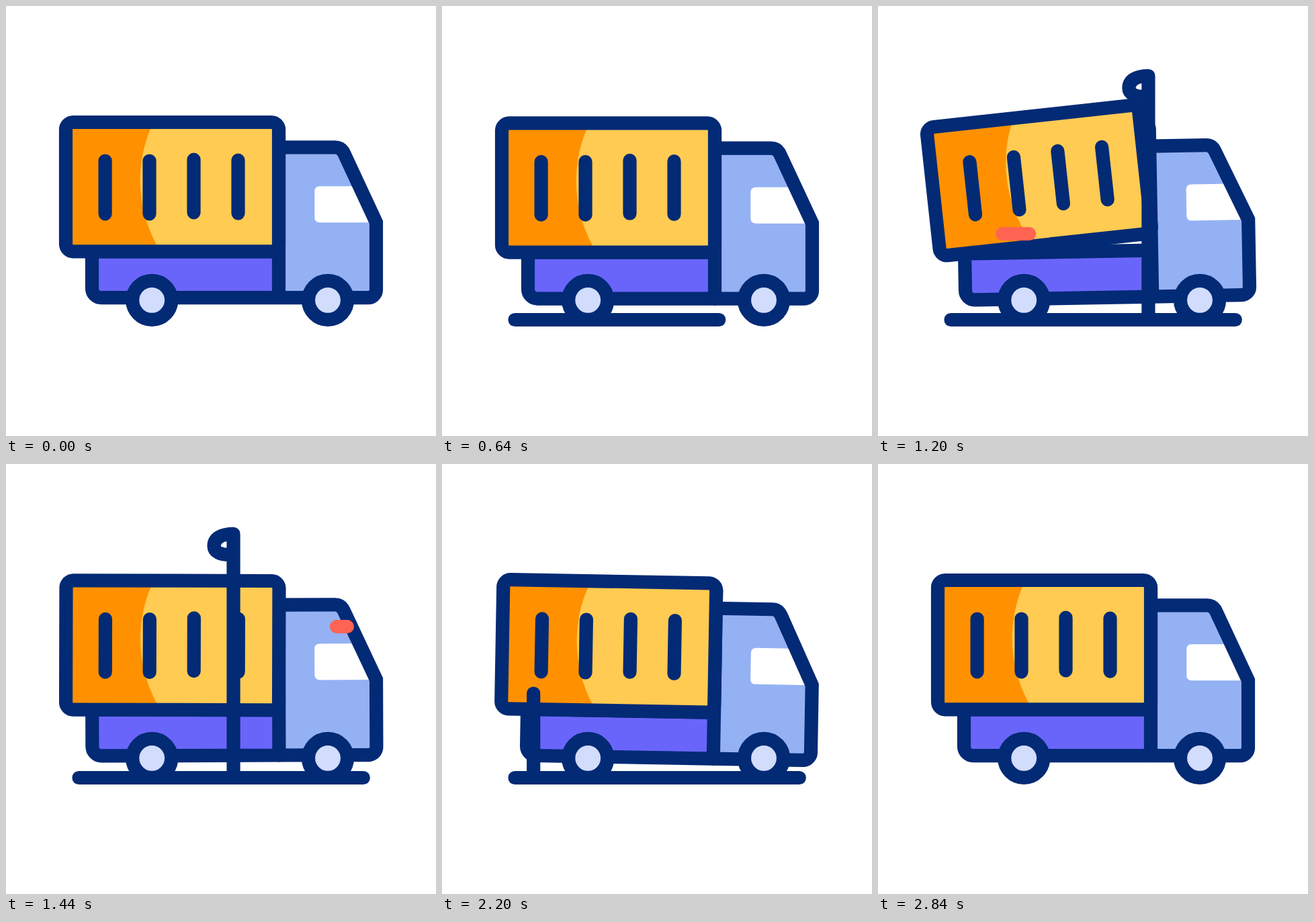
Write an HTML page that moves like this. It is 640 px wide and 640 px high and loops after 3000 ms.

```html
<!DOCTYPE html>
<html lang="en">
<head>
<meta charset="utf-8">
<title>Delivery truck</title>
<style>
html, body { margin: 0; width: 100%; height: 100%; overflow: hidden; background: #fff; }
svg { display: block; width: 100vw; height: 100vh; }
.line { fill: none; stroke: #032a75; stroke-width: 20.2; stroke-linecap: round; stroke-linejoin: round; }
.red { stroke: #ff6453; stroke-width: 20; }
</style>
</head>
<body>
<svg viewBox="0 0 640 640">
  <g id="truck">
    <path fill="#6a65fa" d="M128 365.3H406V434.2H142A14 14 0 0 1 128 420.2Z"/>
    <path fill="#94b1f3" d="M406 210.3H490Q499 210.3 503 219L551 322V422A12 12 0 0 1 539 434.2H406Z"/>
    <path fill="#fff" d="M467 268.3H520L546 322.3H467Q459.3 322.3 459.3 314.5V276Q459.3 268.3 467 268.3Z"/>
    <path class="line" d="M406 365.3H128V420.2A14 14 0 0 0 142 434.2H406V183"/>
    <path class="line" style="stroke-linejoin:miter" d="M406 210.3H490Q499 210.3 503 219L551 322V422A12 12 0 0 1 539 434.2H406"/>
    <g id="box">
      <rect x="89" y="173" width="317" height="192.3" rx="11" fill="#ffcb52"/>
      <path fill="#ff9100" d="M89 183V355Q89 365 99 365H230L224 355C194 300 193 235 215 183L219 173H99Q89 173 89 183Z"/>
      <rect class="line" x="89" y="173" width="317" height="192.3" rx="11"/>
      <path class="line" d="M147.6 230.5V309.3M213.5 230.5V309.3M279.5 228.6V307.4M345.5 229.7V308.6"/>
    </g>
  </g>
  <g class="line" style="fill:#d2dcfc">
    <circle cx="217.2" cy="437.8" r="29"/>
    <circle cx="479" cy="437.8" r="29"/>
  </g>
  <path id="road" class="line"/>
  <path id="low" class="line red"/>
  <path id="high" class="line red"/>
  <path id="mid" class="line red"/>
  <path id="pole" class="line" d="M0 467V104C-17 104-29 110-29 122C-29 131-19 135-7 135H0"/>
</svg>
<script>
const LOOP = 3000, STEP = 40;
const LEFT = 108.5, RIGHT = 531.8;
const el = id => document.getElementById(id);
const pole = el('pole'), poleLen = pole.getTotalLength();

const ramp = (t, from, span = 400) => Math.min(1, Math.max(0, (t - from) / span));
// smooth rise and fall between two times
const swing = (t, from, to) => Math.sin(Math.PI * ramp(t, from, to - from)) ** 2;

const bounce = t => 3.9 * (swing(t, 40, 440) + swing(t, 440, 1440))
  + 4.2 * swing(t, 1440, 2360) - 6.3 * swing(t, 2360, 2840);
const sway = t => 1.15 * swing(t, 1800, 2840) - 1.1 * swing(t, 960, 1520);
const tilt = t => .7 * swing(t, 1400, 1560) - 7.8 * swing(t, 740, 1400);

function segment(id, y, x0, x1) {
  const shown = Math.abs(x1 - x0) > .01;
  el(id).style.display = shown ? '' : 'none';
  if (shown) el(id).setAttribute('d', `M${x0} ${y}H${x1}`);
}

// a streak whose tail follows its head after a lag
function gust(t, id, y, from, to, start, lag = 200) {
  const at = s => from + (to - from) * ramp(t, s);
  segment(id, y, at(start + lag), at(start));
}

function draw(t) {
  el('truck').setAttribute('transform', `translate(0 ${bounce(t)}) rotate(${sway(t)} 217 310)`);
  el('box').setAttribute('transform', `rotate(${tilt(t)} 123 337)`);

  segment('road', 467, LEFT, LEFT + (RIGHT - LEFT) * (ramp(t, 353) - ramp(t, 2265)));
  gust(t, 'low', 339, 453, 185, 660);
  gust(t, 'high', 242, 508, 384, 1388, 167);
  gust(t, 'mid', 400.5, 421, 252, 1600);

  const grown = ramp(t, 715) - ramp(t, 1915);
  pole.style.display = grown > .001 ? '' : 'none';
  pole.setAttribute('transform', `translate(${RIGHT - (RIGHT - LEFT) * ramp(t, 714, 1590)} 0)`);
  pole.setAttribute('stroke-dasharray', `${grown * poleLen} ${poleLen * 2}`);
}

function tick(now) {
  draw(Math.floor(now % LOOP / STEP) * STEP);
  requestAnimationFrame(tick);
}
draw(0);
requestAnimationFrame(tick);
</script>
</body>
</html>
```
